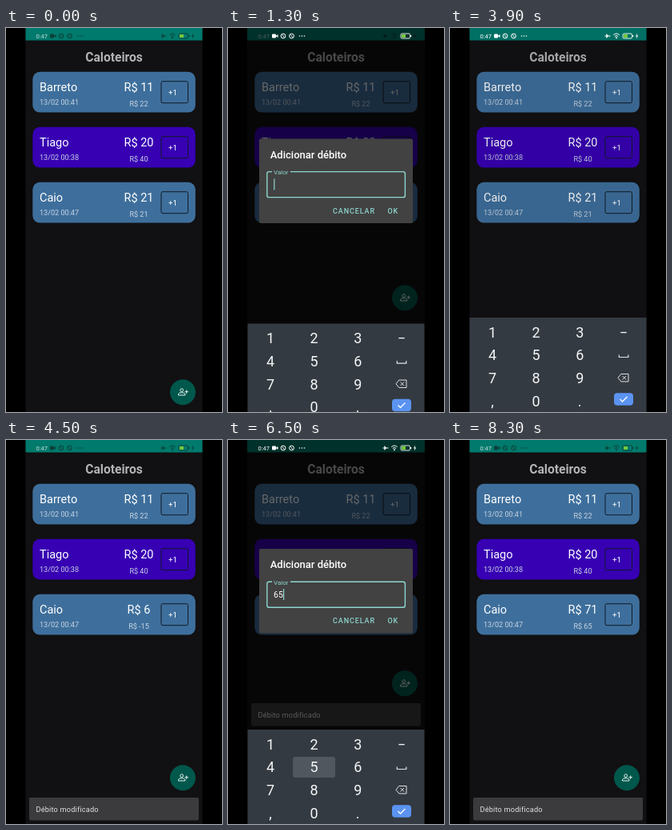
Write an HTML page that moves like this. It is 270 by 480 pixels and loops after 8.4 s.

```html
<!DOCTYPE html>
<html lang="pt-BR">
<head>
<meta charset="utf-8">
<title>Caloteiros</title>
<style>
  html, body { margin: 0; width: 100%; height: 100%; overflow: hidden; background: #000; }
  svg { display: block; width: 100vw; height: 100vh; font-family: Roboto, sans-serif; }
  .mid { text-anchor: middle; }
  .name { font-size: 14.5px; fill: #fff; }
  .small { font-size: 9.1px; fill: #c9d4e2; }
  .plus { font-size: 9.8px; fill: #fff; }
  .key { font-size: 18px; fill: #f4f5f6; }
  .line { fill: none; stroke: currentColor; }
  .action { font-size: 9px; font-weight: 500; letter-spacing: .9px; fill: #8ed6ce; }
  .dark { color: #0c3f39; }
  .light { color: #fff; }
</style>
</head>
<body>
<svg viewBox="0 0 270 480">
  <defs>
    <clipPath id="screen"><rect x="24.5" width="221" height="480"/></clipPath>
    <g id="clock"><text x="37.5" y="12.6" font-size="7.5" fill="currentColor">0:47</text></g>
    <g id="notices" fill="currentColor">
      <rect x="55" y="7.5" width="5" height="5" rx="1"/>
      <path d="M59.5 10l3-2v4z"/>
      <g class="line">
        <circle cx="69" cy="10" r="2.9"/><circle cx="79.5" cy="10" r="2.9"/>
        <path d="M68 8.5l2 3M78.5 8.5l2 3"/>
      </g>
      <circle cx="89.5" cy="10" r=".8"/><circle cx="92.5" cy="10" r=".8"/><circle cx="95.5" cy="10" r=".8"/>
    </g>
    <g id="battery" fill="currentColor">
      <rect class="line" x="216" y="7" width="11.5" height="6" rx="1.5" stroke-width=".9"/>
      <rect x="228" y="9" width="1.2" height="2"/>
      <rect x="217" y="8" width="5" height="4" fill="#75c83c"/>
    </g>
    <g id="signals" fill="currentColor">
      <path d="M193.5 9.5h2l-.5-2h.8l2 2h2.7v1h-2.7l-2 2h-.8l.5-2h-2z"/>
      <path class="line" d="M204.3 8.7q3.7-3.4 7.4 0M205.8 10.5q2.2-2 4.4 0"/>
      <circle cx="208" cy="12.2" r="1"/>
      <path d="M234 6.5l-2 4h1.5l-.5 3 2.2-4h-1.5z"/>
    </g>
  </defs>
  <g clip-path="url(#screen)">
    <rect x="24" width="222" height="480" fill="#111012"/>
    <rect x="24" width="222" height="15.5" fill="#007a6c"/>
    <g id="darkIcons" class="dark"><use href="#notices"/><use href="#battery"/></g>
    <g id="darkStatus" class="dark"><use href="#clock" color="#c4dfdb"/><use href="#signals"/></g>
    <text class="mid" x="135" y="41.5" font-size="15.6" font-weight="700" fill="#b3b2b4">Caloteiros</text>
    <g id="cards"></g>
    <g id="fab">
      <circle cx="221" cy="455.3" r="16" fill="#00574b"/>
      <g transform="translate(221 455)" color="#e7f2f0">
        <circle class="line" cx="-1.3" cy="-2.3" r="1.9"/>
        <path class="line" d="M-5.5 4v-1q0-2.2 4.2-2.2t4.2 2.2v1zM4.7-2.5v4.4M2.5-.3h4.4"/>
      </g>
    </g>
    <g id="snack">
      <rect x="29" y="447" width="212" height="28.5" rx="2" fill="#3b3a3c"/>
      <text x="37.5" y="465" font-size="9.2" letter-spacing=".18" fill="#e2e2e2">Débito modificado</text>
    </g>
    <rect id="dim" x="24" width="222" height="480"/>
    <g id="lightIcons" class="light"><use href="#notices"/><use href="#battery"/></g>
    <g id="lightStatus" class="light"><use href="#clock"/><use href="#signals"/></g>
    <g id="dialog">
      <rect x="39" width="192" height="105.5" rx="2" fill="#424242"/>
      <text x="52.7" y="24.3" font-size="13" font-weight="500" fill="#fff">Adicionar débito</text>
      <rect x="48.8" y="41.2" width="172.6" height="32" rx="2.5" fill="none" stroke="#8ed6ce" stroke-width="1.4"/>
      <rect x="55" y="40" width="23" height="3" fill="#424242"/>
      <text x="57" y="44.6" font-size="8" fill="#8ed6ce">Valor</text>
      <text id="entry" x="57" y="61.3" font-size="10.5" fill="#fff"></text>
      <rect id="cursor" y="50" width="1.2" height="14" fill="#8ed6ce"/>
      <text class="action" x="131" y="93.2">CANCELAR</text>
      <text class="action" x="199.5" y="93.2">OK</text>
    </g>
    <g id="keyboard">
      <rect x="24" width="222" height="120" fill="#343a41"/>
      <rect id="press" x="-26.5" y="-13" width="53" height="26" rx="3" fill="#50575f"/>
      <g id="keys"></g>
      <g color="#dfe2e5">
        <path class="line" d="M211.3 46.5v3h11.5v-3" stroke-width="1.2"/>
        <path class="line" d="M213.8 70.5h9.2v9.5h-9.2l-3.8-4.75zM215.5 73l4.5 4.5m0-4.5l-4.5 4.5"/>
      </g>
      <rect x="205" y="94.3" width="24" height="15.5" rx="4" fill="#5b93f1"/>
      <path class="line" d="M212.5 102l3 3 6-6" color="#fff" stroke-width="1.3"/>
    </g>
  </g>
</svg>
<script>
const LOOP = 8400, TICK = 100, BLINK = 500, KEYBOARD = 118;
const el = Object.fromEntries([...document.querySelectorAll('[id]')].map(n => [n.id, n]));

const people = [
  ['Barreto', '13/02 00:41', 11, 22, '#3e6f9c'],
  ['Tiago', '13/02 00:38', 20, 40, '#3700b3'],
  ['Caio', '13/02 00:47', 21, 21, '#3e6f9c']
];
const money = value => `R$ ${value}`;
el.cards.innerHTML = people.map(([name, date, total, last, color], i) => `
  <g transform="translate(0 ${i * 69})">
    <rect x="33.3" y="54.8" width="203.5" height="50.8" rx="9" fill="${color}"/>
    <text class="name" x="42" y="79">${name}</text>
    <text class="small" x="42" y="96">${date}</text>
    <text class="name mid total" x="166" y="79">${money(total)}</text>
    <text class="small mid last" x="166" y="97.7">${money(last)}</text>
    <rect x="194" y="66.7" width="33.5" height="27" rx="2" fill="none" stroke="#111a26"/>
    <text class="plus mid" x="208.5" y="83.5">+1</text>
  </g>`).join('');
const total = [...document.querySelectorAll('.total')].pop();
const last = [...document.querySelectorAll('.last')].pop();
const [, , firstTotal, firstLast] = people[people.length - 1];

const keyAt = {};
['123-', '456', '789', ',0.'].forEach((row, r) => [...row].forEach((label, c) => {
  const x = 53 + 54.6 * c, y = 18.5 + 28.6 * r;
  keyAt[label] = [x, y];
  el.keys.innerHTML += `<text class="key mid" x="${x}" y="${y + 6.3}">${label.replace('-', '−')}</text>`;
}));

// Each visit to the dialog: when it opens, gets the keyboard, receives keys and closes.
const visits = [
  { open: 400, focus: 1000, text: '-15', keys: [2200, 2400, 2900], close: 3700 },
  { open: 4900, focus: 5300, text: '65', keys: [6200, 6400], close: 7100 }
];

const ramp = (t, from, length) => Math.min(1, Math.max(0, (t - from) / length));
const easeOut = p => 1 - (1 - p) ** 3;
const move = (node, x, y) => node.setAttribute('transform', `translate(${x} ${y})`);
const setText = (node, text) => { if (node.textContent !== text) node.textContent = text; };
const fade = (node, opacity) => { node.style.opacity = opacity; };

function render(t) {
  const visit = visits.filter(v => v.open <= t).pop() || visits[0];
  const { open, focus, text, keys, close } = visit;
  const saved = visits.filter(v => v.close + 300 <= t);
  const between = (from, rise, to, fall) => ramp(t, from, rise) - ramp(t, to, fall);

  const slideIn = easeOut(ramp(t, focus, 500));
  const slideOut = ramp(t, close + 200, 300);
  move(el.keyboard, 0, 480 - KEYBOARD * (slideIn - slideOut));
  move(el.dialog, 0, 174 - 38 * slideIn);
  fade(el.dialog, between(open, 300, close, 200));
  fade(el.dim, .6 * between(open, 500, close, 230));

  const snack = Math.max(...visits.map(v => between(v.close + 300, 300, v.close + 3000, 300)));
  const lift = t > focus - TICK / 2 && t < close + TICK ? KEYBOARD : 0;
  move(el.snack, 0, -lift);
  move(el.fab, 0, -lift - 33 * snack);
  fade(el.snack, snack);

  const icons = between(focus, 300, close + 300, 500);
  const status = between(focus + 300, 400, close + 300, 500);
  fade(el.lightIcons, icons);
  fade(el.darkIcons, 1 - icons);
  fade(el.lightStatus, status);
  fade(el.darkStatus, 1 - status);

  const amounts = saved.map(v => Number(v.text));
  setText(total, money(amounts.reduce((sum, n) => sum + n, firstTotal)));
  setText(last, money(amounts.length ? amounts[amounts.length - 1] : firstLast));

  const typed = keys.filter(k => k <= t);
  const entry = text.slice(0, typed.length);
  setText(el.entry, entry);
  const lastInput = Math.max(focus, ...typed);
  el.cursor.setAttribute('x', 57.2 + (entry ? el.entry.getComputedTextLength() : 0));
  fade(el.cursor, t < focus || Math.floor((t - lastInput) / BLINK) % 2 === 0 ? 1 : 0);

  const pressed = typed.length > 0 && t - lastInput < 2 * TICK;
  fade(el.press, pressed ? 1 : 0);
  if (pressed) move(el.press, ...keyAt[entry[entry.length - 1]]);
}

const start = performance.now();
function frame() {
  const t = (performance.now() - start) % LOOP;
  render(Math.floor(t / TICK) * TICK);
  requestAnimationFrame(frame);
}
frame();
</script>
</body>
</html>
```
